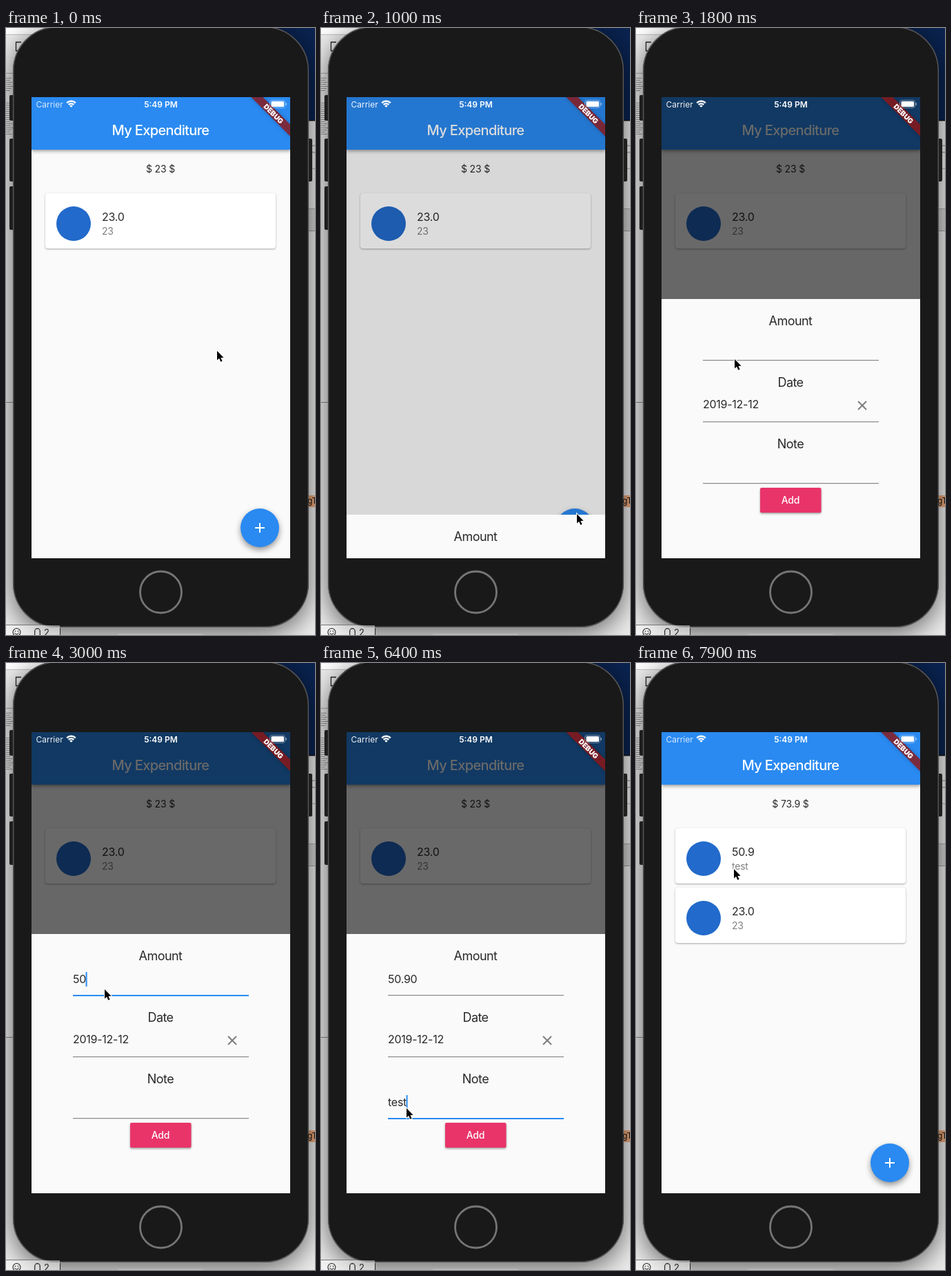
Animation, 448 px wide and 878 px high, one loop 8 s. Source, as an HTML page with a canvas:

```html
<!DOCTYPE html>
<html lang="en">
<head>
<meta charset="utf-8">
<title>My Expenditure</title>
<style>
html, body { margin: 0; width: 100%; height: 100%; overflow: hidden; background: #eee; }
canvas { display: block; width: 100vw; height: 100vh; }
</style>
</head>
<body>
<canvas id="stage" width="448" height="878"></canvas>
<script>
const g = document.getElementById('stage').getContext('2d');
const LOOP = 8000, BLUE = '#2a8af1', INK = 'rgba(0,0,0,.84)', GREY = 'rgba(0,0,0,.5)';

// Keyframes: [time, value, value...]
const POINTER = [
  [0, 306, 467], [850, 371, 703], [1200, 371, 703], [1800, 143, 479], [2300, 143, 479],
  [2700, 143, 472], [3900, 143, 472], [4700, 176, 650], [5050, 176, 650], [5400, 124, 644],
  [6400, 124, 644], [6700, 209, 683], [7300, 209, 683], [7900, 142, 298]
];
// Sheet openness and scrim opacity
const SHEET = [
  [900, 0, 0], [1000, .168, .136], [1100, .74, .41], [1200, .98, .56], [1300, 1, .587],
  [7000, 1, .587], [7100, .94, .57], [7200, .584, .504], [7300, .13, .22], [7400, 0, 0]
];
const AMOUNT = [[1900, ''], [2800, '5'], [3000, '50'], [3600, '50.'], [3900, '50.9'], [4100, '50.90']];
const NOTE = [[5000, ''], [5600, 't'], [5800, 'te'], [6000, 'tes'], [6200, 'test']];
const ADDED = 7050;

const smooth = u => u * u * (3 - 2 * u);

function sample(keys, t, ease = u => u) {
  const i = keys.findIndex(k => k[0] > t);
  if (i < 0) return keys[keys.length - 1].slice(1);
  if (!i) return keys[0].slice(1);
  const a = keys[i - 1], b = keys[i], u = ease((t - a[0]) / (b[0] - a[0]));
  return a.slice(1).map((v, j) => v + (b[j + 1] - v) * u);
}

function box(x, y, w, h, fill, r = 0) {
  g.fillStyle = fill;
  g.beginPath();
  g.roundRect(x, y, w, h, r);
  g.fill();
}

function disc(x, y, r, fill) {
  g.fillStyle = fill;
  g.beginPath();
  g.arc(x, y, r, 0, 7);
  g.fill();
}

function line(color, width, ...pts) {
  g.strokeStyle = color;
  g.lineWidth = width;
  g.beginPath();
  for (let i = 0; i < pts.length; i += 2) g.lineTo(pts[i], pts[i + 1]);
  g.stroke();
}

function arc(x, y, r, from, to, color, width) {
  g.strokeStyle = color;
  g.lineWidth = width;
  g.beginPath();
  g.arc(x, y, r, from, to);
  g.stroke();
}

function text(s, x, y, size, color = INK, { weight = 400, align = 'left', track = -.016 } = {}) {
  g.font = `${weight} ${size}px Inter, "Open Sans", sans-serif`;
  g.letterSpacing = track * size + 'px';
  g.textAlign = align;
  g.fillStyle = color;
  g.fillText(s, x, y);
  return g.measureText(s).width;
}

function shadowed(blur, dy, alpha, draw) {
  g.save();
  g.shadowColor = `rgba(0,0,0,${alpha})`;
  g.shadowBlur = blur;
  g.shadowOffsetY = dy;
  draw();
  g.restore();
}

function desktop() {
  box(0, 0, 448, 878, '#ececec');
  box(0, 0, 80, 9, '#fff');
  box(0, 9, 80, 1, '#c4c4c4');
  line('#222', 1.3, 22, 20.5, 14.5, 20.5, 14.5, 33, 22, 33);
  box(0, 65, 12, 1, '#aaa');
  for (let y = 72; y < 154; y += y === 90 ? 18 : 3) box(0, y, 6 + y % 5, 1, '#999');
  box(0, 541, 12, 1, '#888');
  box(380, 0, 68, 134, '#0a2350');
  box(430, 133, 18, 1.5, '#111');
  arc(446, 175, 5, 0, 7, '#777', 1);
  box(430, 203, 18, 1, '#aaa');
  box(430, 261, 18, 33, '#d2d2d2');
  box(430, 261, 18, 1, '#aaa');
  box(430, 293, 18, 1, '#999');
  box(430, 676, 18, 17, '#eba778');
}

function desktopFront() {
  text('gT', 437, 688, 12, '#111');
  box(0, 864, 78, 14, 'rgba(255,255,255,.45)');
  line('#777', 1, 0, 863.5, 50, 863.5);
  line('#222', 1, 78.5, 868, 78.5, 878);
  arc(15.5, 874, 5.5, 0, 7, '#222', 1.1);
  disc(13.5, 872.5, .8, '#222');
  disc(17.5, 872.5, .8, '#222');
  arc(15.5, 874, 3, .2, 2.9, '#222', 1);
  arc(45.5, 872.5, 3.8, Math.PI, 0, '#222', 1.2);
  line('#222', 1.2, 41.7, 872, 41.7, 878);
  line('#222', 1.2, 49.3, 872, 49.3, 878);
  text('2', 55, 879, 13, '#222');
  box(162, 876.5, 124, 1.5, '#bdbdbd', 1);
}

function phone() {
  for (const [y, h] of [[97, 37], [160, 62], [229, 63]]) box(5, y, 8, h, '#2b2b2b', 2);
  box(436, 160, 8, 62, '#2b2b2b', 2);
  shadowed(38, 8, .6, () => box(10, -2, 429, 869, '#191919', 64));
  g.strokeStyle = '#555';
  g.lineWidth = 1.5;
  g.beginPath();
  g.roundRect(10.7, -1.3, 427.6, 867.6, 63);
  g.stroke();
  arc(224.5, 816, 30, 0, 7, '#757575', 2.8);
}

function card(y, amount, note) {
  shadowed(2.5, 1, .34, () => box(57, y, 334, 80, '#fff', 4));
  disc(98, y + 44, 25, '#226acb');
  text(amount, 139, y + 40, 16);
  text(note, 139, y + 60, 14, GREY);
}

function home(added) {
  box(37, 100, 375, 667, '#fafafa');
  shadowed(5, 2, .4, () => box(37, 100, 375, 76, BLUE));
  text('My Expenditure', 224, 155, 20, '#fff', { weight: 500, align: 'center', track: -.032 });
  text(added ? '$ 73.9 $' : '$ 23 $', 224, 209, 14, INK, { align: 'center', track: -.01 });
  if (added) card(239, '50.9', 'test');
  card(added ? 325 : 239, '23.0', '23');
  shadowed(9, 4, .42, () => disc(368, 723, 28, BLUE));
  line('#fff', 2, 361, 723, 375, 723);
  line('#fff', 2, 368, 716, 368, 730);
}

function field(y, label, keys, t, focused) {
  text(label, 224, y - 51.5, 18, INK, { align: 'center', track: -.03 });
  const [since, value] = keys.filter(k => k[0] <= t).pop() || [0, ''];
  const width = text(value, 97, y - 18, 16);
  if (focused) {
    box(97, y - 1, 255, 2, BLUE);
    if ((t - since) % 1000 < 600) box(97 + width - .5, y - 34, 2, 21, BLUE);
  } else {
    box(97, y - 1, 255, 1.2, '#8c8c8c');
  }
}

function sheet(t, top) {
  box(37, top, 375, 375, '#fafafa');
  field(top + 89, 'Amount', AMOUNT, t, t >= 1900 && t < 5000);
  field(top + 178, 'Date', [], t, false);
  text('2019-12-12', 97, top + 157.5, 16);
  line('#7d7d7d', 2, 322, top + 148, 334, top + 160);
  line('#7d7d7d', 2, 334, top + 148, 322, top + 160);
  field(top + 267, 'Note', NOTE, t, t >= 5000 && t < 7000);
  shadowed(3, 1.5, .4, () => box(180, top + 273, 88.5, 36, '#e9346a', 2));
  text('Add', 224, top + 296, 14, '#fff', { weight: 500, align: 'center' });
}

function banner() {
  g.save();
  g.translate(412, 100);
  g.rotate(Math.PI / 4);
  shadowed(6, 0, .5, () => box(-42, 28, 84, 12, 'rgba(0,0,0,.4)'));
  box(-42, 28, 84, 12, 'rgba(183,28,28,.63)');
  text('DEBUG', 0, 37.8, 10.2, '#fff', { weight: 900, align: 'center', track: 0 });
  g.restore();
}

function statusBar(dimmed) {
  text('Carrier', 43.5, 115, 12, `rgba(255,255,255,${dimmed ? .92 : .8})`, { track: 0 });
  for (const r of [2, 5.6, 9.2]) arc(94.5, 115, r, -2.33, -.81, '#fff', 2.5);
  text('5:49 PM', 224.5, 115, 12, '#fff', { weight: 600, align: 'center', track: 0 });
  g.strokeStyle = 'rgba(255,255,255,.4)';
  g.lineWidth = 1;
  g.beginPath();
  g.roundRect(382.5, 104.5, 22, 11, 3);
  g.stroke();
  box(384.5, 106, 18.5, 8, '#fff', 1.5);
  box(405.5, 108, 1.5, 4, 'rgba(255,255,255,.5)', 1);
}

function pointer(x, y) {
  g.save();
  g.translate(x, y);
  g.beginPath();
  for (const p of [[0, 0], [0, 13.5], [3.1, 10.7], [5.3, 15.8], [7.6, 14.8], [5.4, 9.9], [9.6, 9.8]]) g.lineTo(...p);
  g.closePath();
  g.strokeStyle = '#fff';
  g.lineWidth = 2;
  g.stroke();
  g.fillStyle = '#000';
  g.fill();
  g.restore();
}

function draw(t) {
  const [open, scrim] = sample(SHEET, t);
  desktop();
  phone();
  desktopFront();
  g.save();
  g.beginPath();
  g.rect(37, 100, 375, 667);
  g.clip();
  home(t >= ADDED);
  if (scrim) box(37, 100, 375, 667, `rgba(0,0,0,${scrim})`);
  if (open) sheet(t, 767 - 375 * open);
  banner();
  statusBar(scrim > 0);
  g.restore();
  pointer(...sample(POINTER, t, smooth));
}

const start = performance.now();
function tick() {
  const t = (performance.now() - start) % LOOP;
  draw(Math.floor(t / 100) * 100);
  requestAnimationFrame(tick);
}
tick();
</script>
</body>
</html>
```
